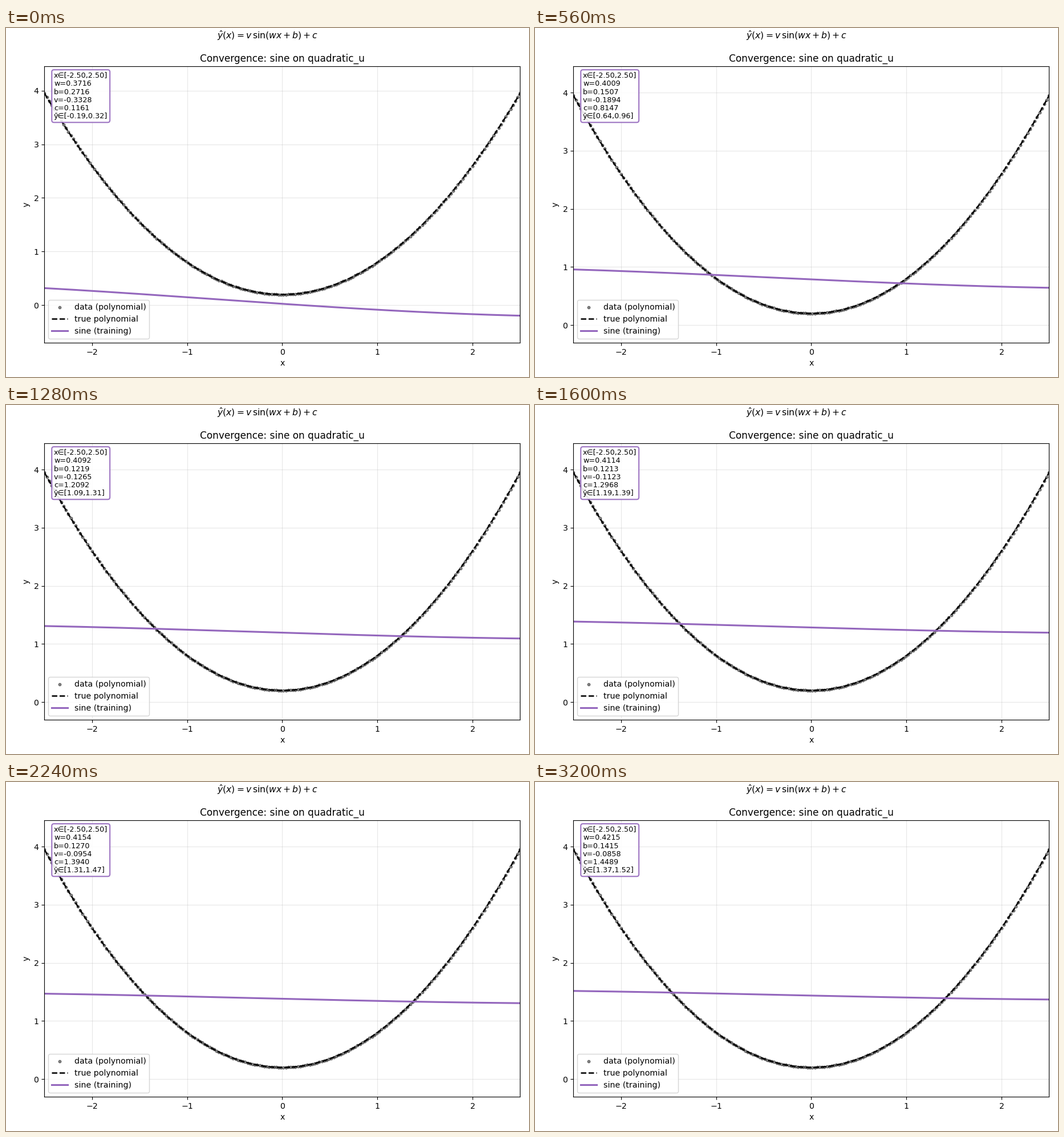
Write a matplotlib script that moves like this. It is 917 by 611 pixels and loops after 3.28 s.

```python
import numpy as np
import matplotlib.pyplot as plt
from matplotlib.animation import FuncAnimation

W, H = 917, 611
DPI = W / 9
PURPLE = "#9467bd"
FRAMES, STEPS, RATE = 41, 25, 0.002

plt.rcParams["font.family"] = "DejaVu Sans"

x = np.linspace(-2.5, 2.5, 200)
y = 0.6 * x**2 + 0.2


def model(p):
    w, b, v, c = p
    return v * np.sin(w * x + b) + c


def descend(p):
    """One step of gradient descent on the mean squared error."""
    w, b, v, _ = p
    s, k = np.sin(w * x + b), np.cos(w * x + b)
    r = model(p) - y
    grad = 2 * np.array([np.mean(r * v * k * x), np.mean(r * v * k),
                         np.mean(r * s), np.mean(r)])
    return p - RATE * grad


def train(p):
    history = [p]
    for _ in range(FRAMES - 1):
        for _ in range(STEPS):
            p = descend(p)
        history.append(p)
    return history


history = train(np.array([0.3716, 0.2716, -0.3328, 0.1161]))

fig = plt.figure(figsize=((W + 1e-6) / DPI, (H + 1e-6) / DPI), dpi=DPI)
left, right, top, bottom = 67.4, 901.4, 67.3, 550.6
ax = fig.add_axes([left / W, 1 - bottom / H, (right - left) / W, (bottom - top) / H])
fig.suptitle(r"$\hat{y}(x)=v\,\sin(wx+b)+c$", fontsize=11, y=0.996)

ax.scatter(x, y, s=10, color="black", alpha=0.45, label="data (polynomial)")
ax.plot(x, y, "--", color="black", lw=1.8, label="true polynomial")
curve, = ax.plot(x, model(history[0]), color=PURPLE, lw=2.2, label="sine (training)")

ax.set_title("Convergence: sine on quadratic_u")
ax.set_xlabel("x")
ax.set_ylabel("y")
ax.set_xlim(-2.5, 2.5)
ax.grid(alpha=0.3)
ax.legend(loc="lower left")
info = ax.text(0.02, 0.98, "", transform=ax.transAxes, fontsize=9, va="top",
               linespacing=1.13,
               bbox=dict(boxstyle="round,pad=0.3", facecolor="white",
                         edgecolor=PURPLE, lw=1.5, alpha=0.9))


def update(i):
    w, b, v, c = history[i]
    fit = model(history[i])
    lo, hi = fit.min(), fit.max()
    curve.set_ydata(fit)
    ax.set_ylim(min(y.min(), lo) - 0.5, max(y.max(), hi) + 0.5)
    info.set_text(f"x∈[{x[0]:.2f},{x[-1]:.2f}]\nw={w:.4f}\nb={b:.4f}\n"
                  f"v={v:.4f}\nc={c:.4f}\nŷ∈[{lo:.2f},{hi:.2f}]")
    return curve, info


anim = FuncAnimation(fig, update, frames=FRAMES, interval=80, repeat=True,
                     repeat_delay=0, blit=False)
plt.show()
```
